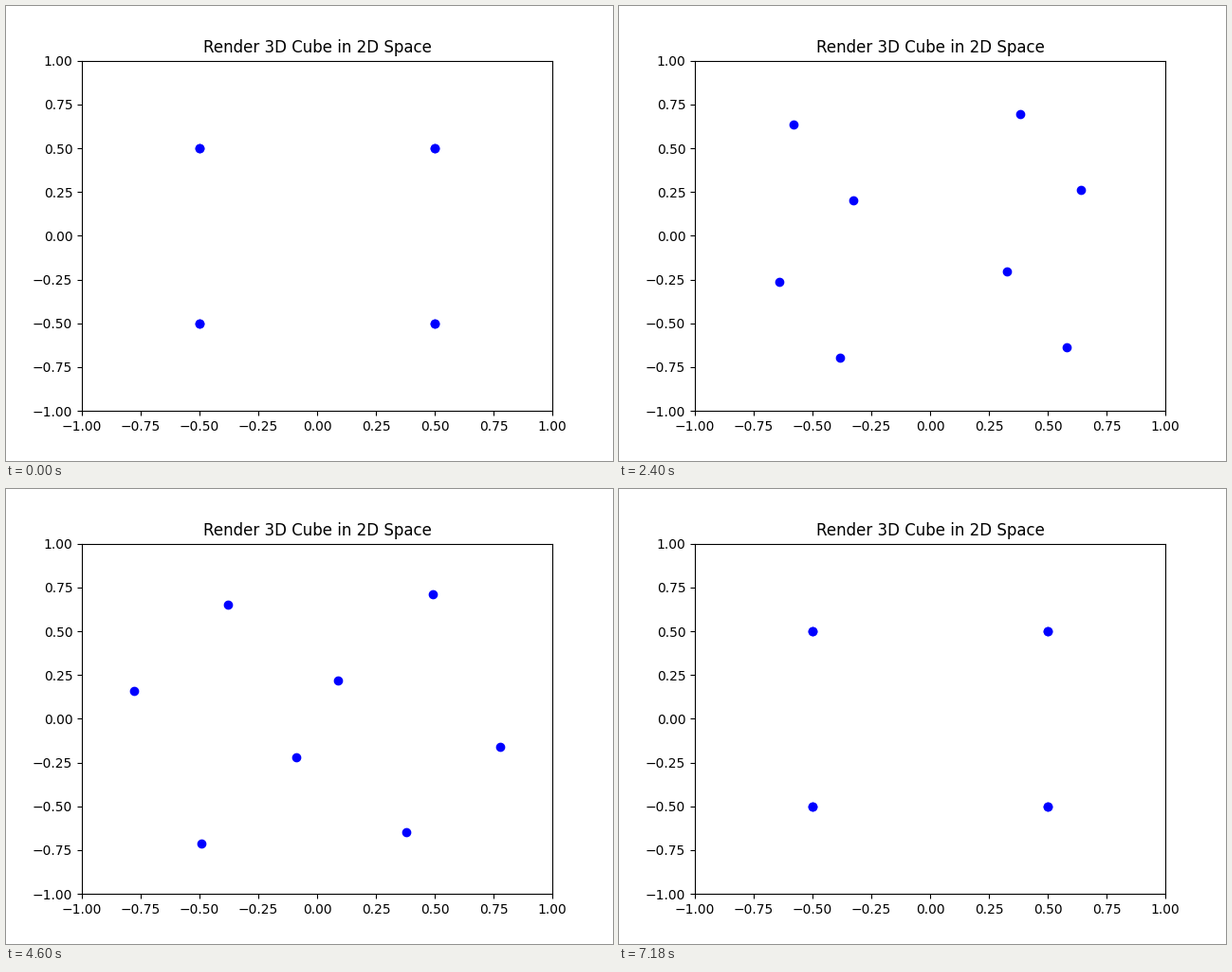
A matplotlib script that plays this animation: 640 px wide and 480 px high, repeating every 7.2 s.

```python
from itertools import product

import matplotlib.pyplot as plt
import numpy as np
from matplotlib.animation import FuncAnimation

FRAMES = 360
INTERVAL = 20

CUBE = np.array(list(product((-0.5, 0.5), repeat=3))).T
ANGLES = np.linspace(0, 2 * np.pi, FRAMES)


def rotation(t):
    """Rotate by the same angle about x, then y, then z."""
    c, s = np.cos(t), np.sin(t)
    rx = np.array([[1, 0, 0], [0, c, -s], [0, s, c]])
    ry = np.array([[c, 0, s], [0, 1, 0], [-s, 0, c]])
    rz = np.array([[c, -s, 0], [s, c, 0], [0, 0, 1]])
    return rz @ ry @ rx


fig, ax = plt.subplots(figsize=(6.4, 4.8), dpi=100)
ax.set_xlim(-1, 1)
ax.set_ylim(-1, 1)
ax.set_title("Render 3D Cube in 2D Space")
dots, = ax.plot([], [], "bo")


def update(i):
    x, y, _ = rotation(ANGLES[i]) @ CUBE
    dots.set_data(x, y)
    return dots,


anim = FuncAnimation(fig, update, frames=FRAMES, interval=INTERVAL,
                     blit=True, repeat=True, repeat_delay=0)
plt.show()
```
